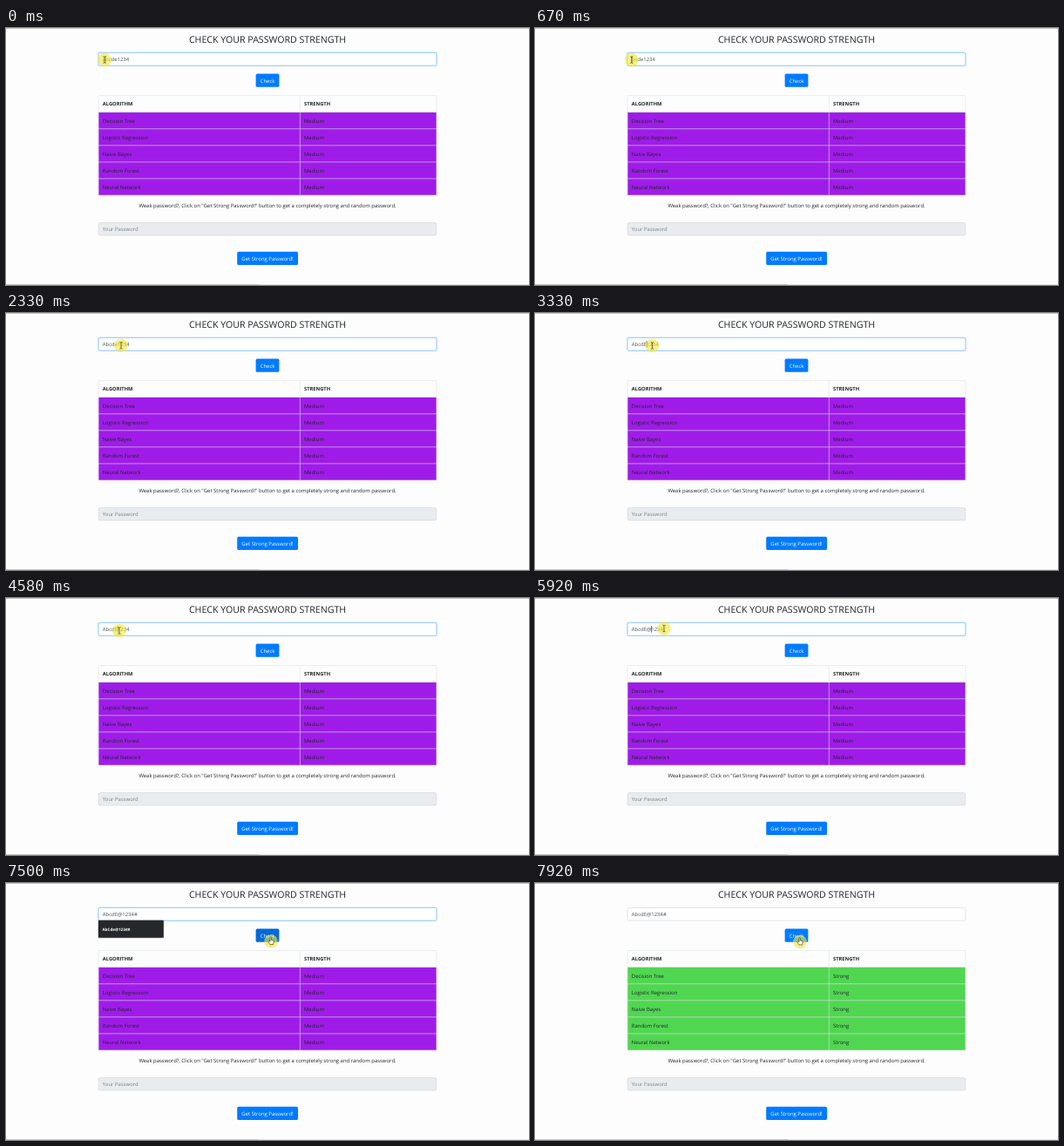
Write an HTML page that moves like this. It is 600 px wide and 295 px high and loops after 8 s.

```html
<!DOCTYPE html>
<html lang="en">
<head>
<meta charset="utf-8">
<title>Password strength</title>
<style>
html, body { margin: 0; width: 100%; height: 100%; overflow: hidden; background: #fdfdfd; }
svg { display: block; width: 600px; height: 295px; }
text { font: 5.94px "Open Sans", "Noto Sans", sans-serif; fill: #212529; text-rendering: geometricPrecision; white-space: pre; }
.mid { text-anchor: middle; }
.title { font-size: 10.62px; font-weight: 500; }
.bold { font-weight: 700; font-size: 5.75px; }
.white { fill: #fff; }
.field { stroke: #ced4da; stroke-width: .6; }
.btn { fill: #007bff; }
.grid { stroke: #dee2e6; stroke-width: .6; fill: none; }
#popup text { fill: #fff; font-size: 4.6px; font-weight: 700; }
</style>
</head>
<body>
<svg viewBox="0 0 600 295">
  <rect width="600" height="1" fill="#c4c4c4"/>
  <rect y="294" width="600" height="1" fill="#e4e4e4"/>
  <rect y="294" width="290" height="1" fill="#c9c9c9"/>

  <text class="mid title" x="300" y="17.2">CHECK YOUR PASSWORD STRENGTH</text>

  <rect id="glow" x="105.3" y="27.6" width="389.4" height="16.4" rx="2.2" fill="#bfdeff"/>
  <rect id="input" class="field" x="106.2" y="28.5" width="387.6" height="14.6" rx="1.6" fill="#fff"/>
  <text id="value" x="110.8" y="38.4" style="fill:#495057"></text>
  <rect id="caret" y="32" width=".7" height="7.6" fill="#333"/>

  <rect id="check" class="btn" x="286.6" y="52.6" width="26.8" height="15.2" rx="1.6"/>
  <text class="mid white" x="300" y="62.6">Check</text>

  <rect id="rows" x="106" y="96.6" width="388" height="95.4"/>
  <g id="table"></g>

  <text class="mid" x="300" y="205.8">Weak password?, Click on "Get Strong Password!" button to get a completely strong and random password.</text>
  <rect class="field" x="106.2" y="223.6" width="387.6" height="14.4" rx="1.6" fill="#e9ecef"/>
  <text x="110.8" y="233.3" style="fill:#7b838a">Your Password</text>
  <rect class="btn" x="265.2" y="256.8" width="69.8" height="15.2" rx="1.6"/>
  <text class="mid white" x="300" y="266.8">Get Strong Password!</text>

  <g id="popup">
    <rect x="105.4" y="42.8" width="75.8" height="20.8" rx="1.2" fill="#000" opacity=".25"/>
    <rect x="106" y="42.8" width="74.8" height="20" rx="1" fill="#25272a"/>
    <text id="hint" x="110.4" y="54.6"></text>
  </g>

  <g id="mouse">
    <circle r="7.8" fill="#f2e638" opacity=".62"/>
    <path id="beam" d="M-1.5-3.8Q0-3.8 0-3Q0-3.8 1.5-3.8M0-3V3M-1.5 3.8Q0 3.8 0 3Q0 3.8 1.5 3.8" fill="none" stroke="#333" stroke-width=".7"/>
    <path id="hand" d="M-1-4.5Q-.3-5.2.3-4.5V-1.6L2.6-1Q3.4-.6 3.2.4L2.5 3.5H-1L-3.2.2Q-3-.9-2-.5L-1 .3Z" fill="#fff" stroke="#222" stroke-width=".6"/>
  </g>
</svg>
<script>
const LOOP = 8000, LEFT = 110.8;
const $ = id => document.getElementById(id);
const show = (id, on) => $(id).setAttribute("visibility", on ? "visible" : "hidden");
const set = (id, attrs) => { for (const k in attrs) $(id).setAttribute(k, attrs[k]); };

// Table
const names = ["Decision Tree", "Logistic Regression", "Naive Bayes", "Random Forest", "Neural Network"];
let html = '<text class="bold" x="110.8" y="89.2">ALGORITHM</text><text class="bold" x="342" y="89.2">STRENGTH</text>';
names.forEach((name, i) => {
  const y = 108.8 + i * 19.05;
  html += `<text x="110.8" y="${y}">${name}</text><text class="level" x="342" y="${y}"></text>`;
  if (i) html += `<path class="grid" d="M106 ${96.7 + i * 19.05}H494"/>`;
});
html += '<path class="grid" d="M106.2 77.6H493.8V192H106.2ZM337.3 77.6V192"/><path class="grid" style="stroke-width:1" d="M106 96.5H494"/>';
$("table").innerHTML = html;

// Each edit: time, text, caret index
const edits = [
  [0, "abcde1234", 1], [500, "bcde1234", 0], [1000, "Abcde1234", 1], [1580, "Abcde1234", 5],
  [2500, "Abcd1234", 4], [2915, "AbcdE1234", 5], [4580, "AbcdE1234", 5],
  [4915, "AbcdE@1234", 6], [6000, "AbcdE@1234", 10], [6660, "AbcdE@1234#", 11]
];
// Suggestion list: from, to, text
const hints = [
  [1330, 1580, "abcde1234"], [3415, 4580, "abcde1234"],
  [5415, 5830, "AbCde@1234#"], [6915, 7580, "AbCde@1234#"]
];
// Pointer: time, x, y
const path = [
  [0, 113, 36.5], [80, 113, 36.5], [170, 110, 36.5], [600, 110, 36.5], [830, 114, 37], [1330, 128, 37],
  [2000, 128, 37], [2580, 134.5, 37.5], [3330, 134.5, 37.5], [3700, 134.5, 37.5], [4170, 130, 37.5],
  [4830, 130, 37.5], [5080, 134, 37], [5420, 138, 35], [5670, 147, 34.5], [5920, 148, 35],
  [6330, 154, 34.5], [6500, 154, 34.5], [6670, 168, 36], [6830, 172, 37], [7170, 303, 64],
  [7400, 304, 67], [8000, 304, 67.5]
];

function pointerAt(t) {
  const i = path.findIndex(p => p[0] > t), a = path[i - 1], b = path[i];
  const k = (t - a[0]) / (b[0] - a[0]), s = k * k * (3 - 2 * k);
  return [a[1] + (b[1] - a[1]) * s, a[2] + (b[2] - a[2]) * s];
}

function draw(t) {
  const [since, text, at] = edits.filter(e => e[0] <= t).pop();
  const focus = t < 7580, done = t >= 7830;

  $("value").textContent = text;
  const offset = at ? $("value").getSubStringLength(0, at) : 0;
  set("caret", { x: LEFT + offset - .2 });
  show("caret", focus && (t - since) % 1000 < 500);
  show("glow", focus);
  $("input").style.stroke = focus ? "#80bdff" : "#ced4da";

  const hint = hints.find(h => h[0] <= t && t < h[1]);
  show("popup", hint);
  if (hint) $("hint").textContent = hint[2];

  set("rows", { fill: done ? "#51d651" : "#9f1ce8" });
  document.querySelectorAll(".level").forEach(e => e.textContent = done ? "Strong" : "Medium");

  const [x, y] = pointerAt(t), over = y > 52;
  set("mouse", { transform: `translate(${x} ${y})` });
  show("beam", !over);
  show("hand", over);
  $("check").style.fill = over && !done ? "#0069d9" : "#007bff";
}

const start = performance.now();
function tick() {
  draw((performance.now() - start) % LOOP);
  requestAnimationFrame(tick);
}
tick();
</script>
</body>
</html>
```
